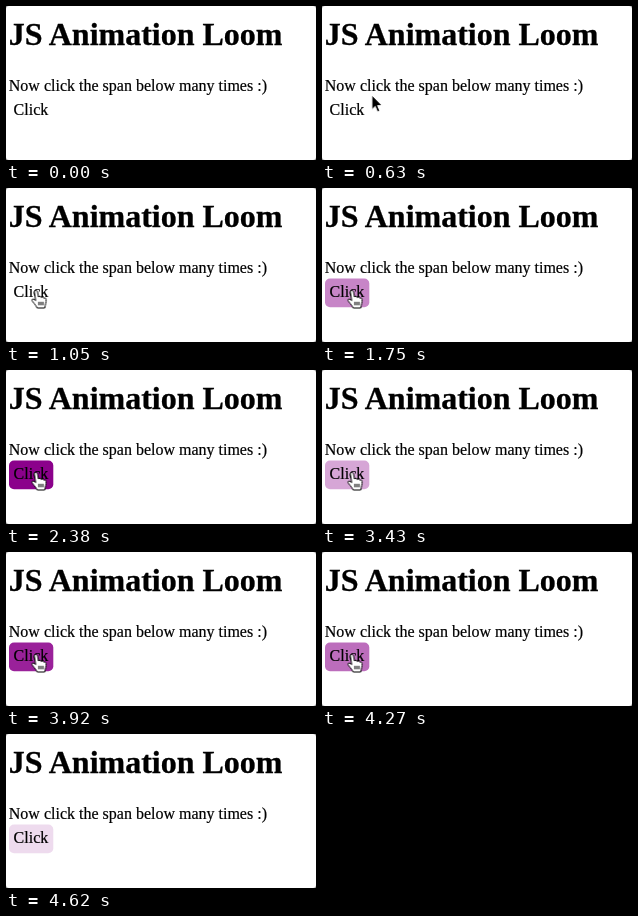
Recreate the animation shown at these times as an HTML page. Size 310 px wide and 154 px high, loop 4690 ms.

```html
<!DOCTYPE html>
<html lang="en">
<head>
<meta charset="utf-8">
<title>Click transition</title>
<style>
  html, body { margin: 0; width: 100%; height: 100%; overflow: hidden; background: #8a8a8a; }
  svg { display: block; width: 310px; height: 154px; }
  text { font: 16px "Liberation Serif", "Times New Roman", serif; fill: #000; stroke: #000; stroke-width: .2; }
  .title { font-size: 32px; font-weight: bold; stroke-width: .3; }
  #pill { fill: darkmagenta; opacity: 0; }
  #ring { fill: none; stroke: #111; stroke-width: 1.4; opacity: 0; }
  #cursor, #hand, #arrow { opacity: 0; }
  #hand path { fill: #fff; stroke: #000; stroke-width: 1; stroke-linejoin: round; }
  #arrow path { fill: #000; stroke: #fff; stroke-width: 1; }
</style>
</head>
<body>
<svg viewBox="0 0 310 154">
  <rect width="310" height="154" rx="3" fill="#fff"/>
  <text class="title" x="2.7" y="38.5">JS Animation Loom</text>
  <text x="2.8" y="85">Now click the span below many times :)</text>
  <rect id="pill" x="3" y="90.5" width="44.3" height="28.8" rx="5"/>
  <text x="7.6" y="109">Click</text>
  <circle id="ring" cx="30.7" cy="103" r="30.5"/>
  <g id="cursor">
    <g id="hand">
      <path d="M-2.2 1C-2.2-1 .8-1 1.1 1L2 6C2.8 5 4.6 5.2 4.8 6.6C5.8 5.6 7.4 6 7.5 7.3C8.5 6.6 9.5 7.2 9.6 8.4C9.9 11.4 8.8 13 8.3 17H.6C-.2 14.2-4.2 11-4.5 9.3C-4.7 7.8-2.7 7.6-.8 9.6Z"/>
      <path d="M2.4 10.8v3.5M4.4 10.8v3.5M6.4 10.8v3.5"/>
    </g>
    <g id="arrow"><path d="M0 0V14.5L3.3 11.4L5.6 16.8L8 15.8L5.7 10.5H10.3Z"/></g>
  </g>
</svg>
<script>
const LOOP = 4690;

// Each frame is [ms, style, easing to the next frame].
function play(id, frames) {
  const keys = frames.map(([ms, style, easing = "linear"]) =>
    ({ offset: ms / LOOP, easing, ...style }));
  document.getElementById(id).animate(keys, { duration: LOOP, iterations: Infinity });
}

// Shows an element only within the given [from, to] spans.
function show(id, spans) {
  const frames = [[0, { opacity: 0 }, "step-end"]];
  for (const [from, to] of spans) {
    frames.push([from, { opacity: 1 }, "step-end"], [to, { opacity: 0 }, "step-end"]);
  }
  play(id, [...frames, [LOOP, { opacity: 0 }]]);
}

// A one-second "ease" fade-out, interrupted after `length` ms.
const fade = (start, length) =>
  [[0, 1], [70, .94], [140, .84], [250, .59], [400, .32], [540, .18], [610, .14], [680, .1]]
    .filter(([ms]) => ms <= length)
    .map(([ms, opacity]) => [start + ms, { opacity }]);

const falling = fade(2470, 540);
falling[falling.length - 1].push("cubic-bezier(.5, 0, 1, 1)");

play("pill", [
  [0, { opacity: 0 }],
  [1470, { opacity: 0 }, "ease"],
  ...falling,
  ...fade(4010, 680),
]);

show("ring", [[910, 1050], [1400, 1540], [2870, 3010]]);
show("cursor", [[350, 4620]]);
show("hand", [[700, 4550]]);
show("arrow", [[350, 700], [4550, 4620]]);

const at = (x, y) => ({ transform: `translate(${x}px, ${y}px)` });
play("cursor", [
  [0, at(122, 137)],
  [350, at(122, 137)],
  [490, at(85, 104)],
  [630, at(50, 89)],
  [700, at(39, 95)],
  [840, at(30.5, 103)],
  [4340, at(30.5, 103)],
  [4410, at(35, 108)],
  [4480, at(43, 116)],
  [4550, at(56, 125)],
  [LOOP, at(58, 126)],
]);
</script>
</body>
</html>
```
